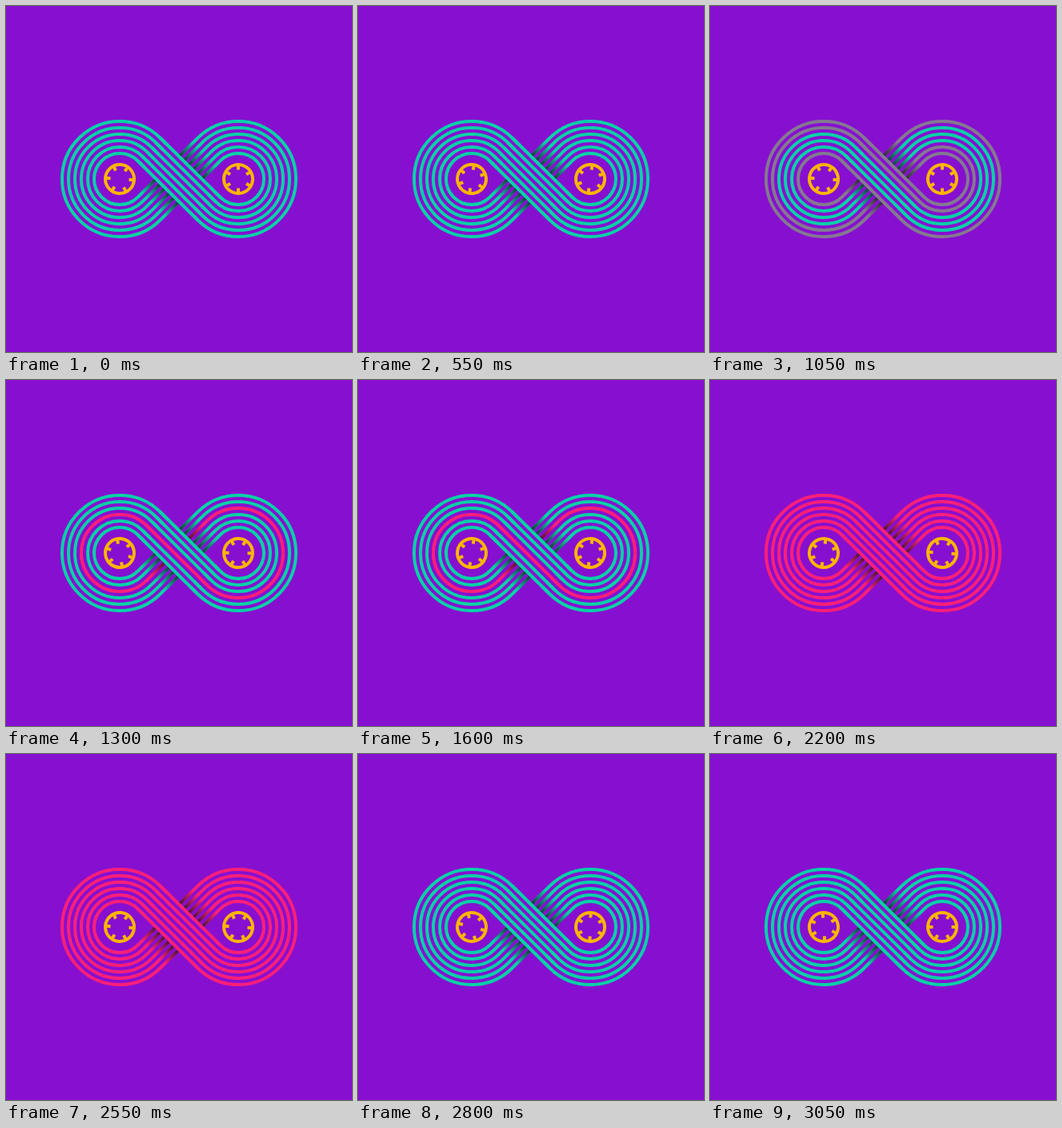
These frames come from a looping animation (432x432 px, 3.1 s). An HTML page with a canvas:

```html
<!DOCTYPE html>
<html>
<head>
<meta charset="utf-8">
<style>
html, body { margin: 0; width: 100%; height: 100%; overflow: hidden; background: #870fd0; }
canvas { display: block; }
</style>
</head>
<body>
<canvas id="stage" width="432" height="432"></canvas>
<script>
const ctx = document.getElementById('stage').getContext('2d');
const LOOP = 3100, STEP = 50;
const BG = '#870fd0', TEAL = [6, 210, 167], PINK = [255, 31, 120], GOLD = '#ffb400';
const LEFT = 142, RIGHT = 290, MID = 216;
const RADII = [72, 64, 56, 48, 40, 32], SUM = 104;
// Each tape line is the inner tangent of two circles.
const tilt = Math.acos(SUM / (RIGHT - LEFT));
const cos = Math.cos(tilt), sin = Math.sin(tilt);

// Which lines (outer to inner on the left) are pink from each time on.
const BEATS = [
  [0, []], [600, [0, 1, 5]], [1050, []], [1150, [3]],
  [1650, [1, 2]], [2150, [0, 1, 2, 3, 4, 5]], [2750, []]
];
const TIMES = [0, 550, 1050, 1600, 2200, 2550, 3050];
const TURN_LEFT = [4, 39, 64, 99, 158, 184, 206];
const TURN_RIGHT = [30, 98, 150, 218, 304, 364, 420];

function lerp(a, b, k) { return a + (b - a) * k; }

function turn(angles, t) {
  let i = 0;
  while (i < TIMES.length - 2 && t > TIMES[i + 1]) i++;
  return lerp(angles[i], angles[i + 1], (t - TIMES[i]) / (TIMES[i + 1] - TIMES[i]));
}

// A line shows the halfway colour for one step when it switches.
function lineColor(line, t) {
  let i = BEATS.length - 1;
  while (BEATS[i][0] > t) i--;
  const now = +BEATS[i][1].includes(line);
  const before = i ? +BEATS[i - 1][1].includes(line) : now;
  const k = t - BEATS[i][0] < STEP ? (now + before) / 2 : now;
  return `rgb(${TEAL.map((c, n) => Math.round(lerp(c, PINK[n], k)))})`;
}

function segment(r, side) {
  const q = SUM - r;
  ctx.beginPath();
  ctx.moveTo(LEFT + r * cos, MID + side * r * sin);
  ctx.lineTo(RIGHT - q * cos, MID - side * q * sin);
  ctx.stroke();
}

function makeShade() {
  const reach = 45, edge = 22;
  const g = ctx.createLinearGradient(
    MID - reach * sin, MID + reach * cos, MID + reach * sin, MID - reach * cos);
  const inner = edge / reach / 2;
  g.addColorStop(0, 'rgba(30,20,40,0)');
  g.addColorStop(0.5 - inner, 'rgba(30,20,40,.8)');
  g.addColorStop(0.5 + inner, 'rgba(30,20,40,.8)');
  g.addColorStop(1, 'rgba(30,20,40,0)');
  return g;
}
const shade = makeShade();

function drawTape(t) {
  const colors = RADII.map((r, i) => lineColor(i, t));
  ctx.lineWidth = 4;
  RADII.forEach((r, i) => {
    ctx.strokeStyle = colors[i];
    ctx.beginPath();
    ctx.arc(LEFT, MID, r, tilt, -tilt);
    ctx.arc(RIGHT, MID, SUM - r, Math.PI - tilt, Math.PI + tilt, true);
    ctx.closePath();
    ctx.stroke();
    ctx.strokeStyle = shade;
    segment(r, 1);
  });
  // The upper strand covers the lower one.
  ctx.strokeStyle = BG;
  ctx.lineWidth = 44;
  ctx.beginPath();
  ctx.moveTo(MID - 40 * sin, MID - 40 * cos);
  ctx.lineTo(MID + 40 * sin, MID + 40 * cos);
  ctx.stroke();
  ctx.lineWidth = 4;
  RADII.forEach((r, i) => {
    ctx.strokeStyle = colors[i];
    segment(r, -1);
  });
}

function drawReel(x, degrees) {
  ctx.save();
  ctx.translate(x, MID);
  ctx.rotate(degrees * Math.PI / 180);
  ctx.strokeStyle = GOLD;
  ctx.lineWidth = 4;
  ctx.beginPath();
  ctx.arc(0, 0, 18, 0, 2 * Math.PI);
  ctx.stroke();
  for (let i = 0; i < 6; i++) {
    ctx.beginPath();
    ctx.moveTo(11.5, 0);
    ctx.lineTo(17, 0);
    ctx.stroke();
    ctx.rotate(Math.PI / 3);
  }
  ctx.restore();
}

const start = performance.now();
function draw() {
  const elapsed = (performance.now() - start) % LOOP;
  const t = Math.floor(elapsed / STEP) * STEP;
  ctx.fillStyle = BG;
  ctx.fillRect(0, 0, 432, 432);
  drawTape(t);
  drawReel(LEFT, turn(TURN_LEFT, t));
  drawReel(RIGHT, turn(TURN_RIGHT, t));
  requestAnimationFrame(draw);
}
draw();
</script>
</body>
</html>
```
